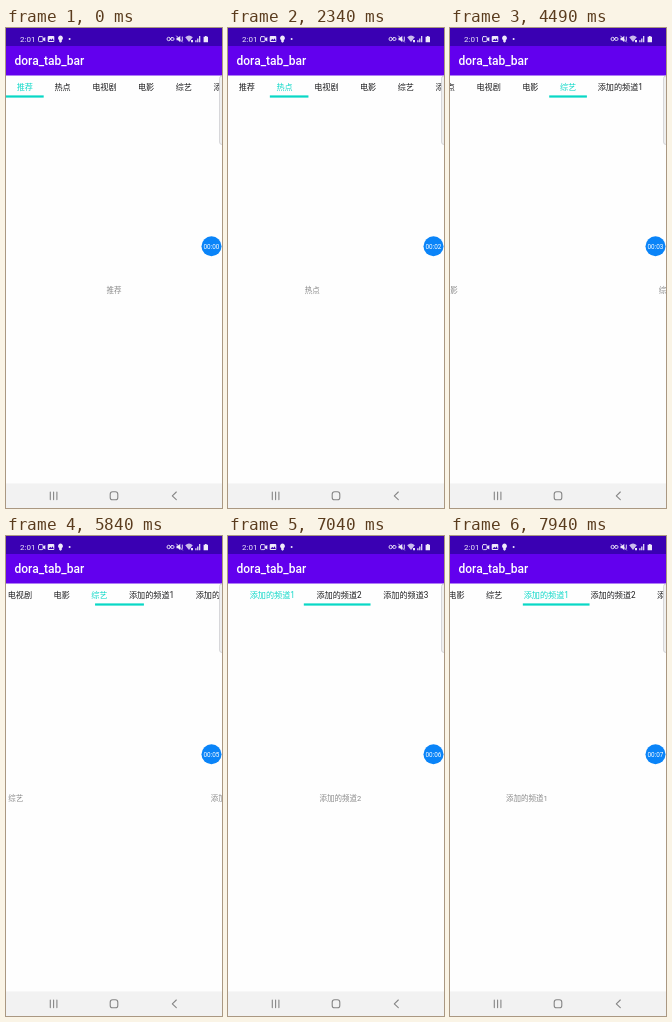
An HTML page that plays this animation: 216 px wide and 480 px high, repeating every 7990 ms.

```html
<!DOCTYPE html>
<html lang="zh">
<head>
<meta charset="utf-8">
<title>dora_tab_bar</title>
<style>
  html, body { margin: 0; width: 100%; height: 100%; overflow: hidden; background: #fefefe; }
  svg { display: block; width: 216px; height: 480px; }
  text { font-family: Roboto, "Noto Sans CJK SC", "Noto Sans CJK", sans-serif; }
  #tabs text { font-size: 8.15px; fill: #1c1c1e; text-anchor: middle; }
  #tabs text.on { fill: #10d8c8; }
  #pages text { font-size: 7.5px; fill: #8a8a8a; text-anchor: middle; }
  #clock { font-size: 6.4px; fill: #fff; text-anchor: middle; }
  .line { fill: none; stroke-linecap: round; stroke-linejoin: round; }
</style>
</head>
<body>
<svg viewBox="0 0 216 480">
  <rect width="216" height="480" fill="#fefefe"/>
  <g id="pages"></g>
  <g id="tabs"></g>
  <rect id="bar" y="67.4" height="2.2" fill="#08d8c6"/>

  <rect width="216" height="47.5" fill="#6200ee"/>
  <rect width="216" height="18" fill="#3a00b3"/>
  <text x="8.5" y="37.3" font-size="12" font-weight="500" fill="#fff">dora_tab_bar</text>

  <!-- status bar -->
  <g fill="#eee9fa">
    <text x="14" y="14" font-size="8">2:01</text>
    <path d="M37 10.5l2.3-1.5v4.4L37 12z"/>
    <rect x="41.7" y="8" width="6.6" height="6" rx="1"/>
    <path d="M42.6 13l1.6-2.2 1.2 1.2 1.2-1.8 1.2 2.8z" fill="#3a00b3"/>
    <path d="M54.5 7.6a2.5 2.5 0 0 1 1.3 4.6v1.6l-1.3 1-1.3-1v-1.6a2.5 2.5 0 0 1 1.3-4.6z"/>
    <circle cx="63.6" cy="11" r="1"/>
    <path d="M170.5 9.8h1.6l2.2-2v6.4l-2.2-2h-1.6z"/>
    <path d="M179.2 9.2q3.8-3.2 7.6 0L183 14z" opacity=".8"/>
    <path d="M185 12h2v2.2h-2z"/>
    <path d="M189.3 12.3h1.2v1.9h-1.2zM191.2 10.5h1.2v3.7h-1.2zM193.1 8h1.2v6.2h-1.2z"/>
    <path d="M198.9 8h1.8v.8h1.3v5.4h-4.4V8.800h1.3z"/>
  </g>
  <g class="line" stroke="#eee9fa" stroke-width=".9">
    <rect x="32.500" y="8.600" width="4.500" height="5" rx="1"/>
    <circle cx="162.700" cy="11" r="1.700"/>
    <rect x="164.700" y="9.600" width="3.300" height="2.800" rx="1.200"/>
    <path d="M170.600 8l5.800 6M176.300 9v3.500"/>
  </g>

  <rect x="213.500" y="48" width="8" height="68.500" rx="2.500" fill="#efefef" stroke="#cfcfd2" stroke-width=".8"/>

  <circle cx="205.500" cy="218.200" r="10" fill="#0a84f8"/>
  <text id="clock" x="205.500" y="220.600">00:00</text>

  <!-- navigation bar -->
  <rect y="455.500" width="216" height="24.500" fill="#f2f2f2"/>
  <g class="line" stroke="#858585" stroke-width="1.100">
    <path d="M44.300 464v7.600M47.600 464v7.600M50.900 464v7.600"/>
    <rect x="104.200" y="463.800" width="7.600" height="8" rx="2.400"/>
    <path d="M170.300 464l-4 3.800 4 3.800"/>
  </g>
</svg>
<script>
const LOOP = 7990, WIDTH = 216, FONT = 8.15, PAD = 10.7;
const names = ["推荐", "热点", "电视剧", "电影", "综艺", "添加的频道1", "添加的频道2", "添加的频道3"];

// [time, page position, ease-out power on the way there]
const moves = [
  [0, 0, 1], [1600, 0, 1], [2140, 1, 3], [2300, 1.11, 2],
  [2850, 1.11, 1], [3340, 2, 3],
  [4400, 2, 1], [4740, 4, 4.5],
  [5710, 4, 1], [5840, 4.455, 1], [6140, 5, 2.5],
  [6700, 5, 1], [7290, 6, 4.56],
  [7700, 6, 1], [7940, 5.144, 2.1], [LOOP, 5.144, 1]
];
const tap = { from: 4400, to: 4740, start: 2, tab: 4 };
const ticks = [[0, 0], [1280, 1], [2290, 2], [3300, 3], [5290, 5], [6300, 6], [7290, 7]];

const $ = id => document.getElementById(id);
const mix = (a, b, k) => a + (b - a) * k;

let edge = 0;
const tabs = names.map(name => {
  const digit = /\d/.test(name);
  const w = FONT * (name.length - (digit ? 0.44 : 0)) + 2 * PAD;
  const tab = { x: edge, w, scroll: Math.max(0, edge + w / 2 - WIDTH / 2) };
  edge += w;
  return tab;
});

function addLabels(id, y) {
  return names.map(name => {
    const el = document.createElementNS("http://www.w3.org/2000/svg", "text");
    el.textContent = name;
    el.setAttribute("y", y);
    $(id).append(el);
    return el;
  });
}
const tabLabels = addLabels("tabs", 62);
const pageLabels = addLabels("pages", 265.4);

function position(t) {
  const i = moves.findIndex(m => m[0] > t);
  if (i < 1) return moves[0][1];
  const [t0, p0] = moves[i - 1], [t1, p1, power] = moves[i];
  return mix(p0, p1, 1 - (1 - (t - t0) / (t1 - t0)) ** power);
}

function between(key, p) {
  const i = Math.min(Math.floor(p), tabs.length - 2);
  return mix(tabs[i][key], tabs[i + 1][key], p - i);
}

function draw(time) {
  // the screen refreshes every 50 ms
  const t = Math.max(0, Math.floor((time - 40) / 50) * 50 + 40);
  const page = position(t);
  let selected = Math.floor(page + 0.001);
  let barPos = position(t - 20);
  let scroll = between("scroll", position(t - 50));

  if (t >= tap.from && t < tap.to + 50) {
    const k = (page - tap.start) / (tap.tab - tap.start);
    selected = barPos = tap.tab;
    scroll = mix(tabs[tap.start].scroll, tabs[tap.tab].scroll, 1 - Math.max(0, 1 - k) ** 1.4);
  }

  names.forEach((_, i) => {
    tabLabels[i].setAttribute("x", tabs[i].x + tabs[i].w / 2 - scroll);
    tabLabels[i].classList.toggle("on", i === selected);
    pageLabels[i].setAttribute("x", WIDTH / 2 + WIDTH * (i - page));
  });
  $("bar").setAttribute("x", between("x", barPos) - scroll);
  $("bar").setAttribute("width", between("w", barPos));
  $("clock").textContent = "00:0" + ticks.filter(k => k[0] <= time).pop()[1];
}

const begin = performance.now();
function loop() {
  draw((performance.now() - begin) % LOOP);
  requestAnimationFrame(loop);
}
loop();
</script>
</body>
</html>
```
